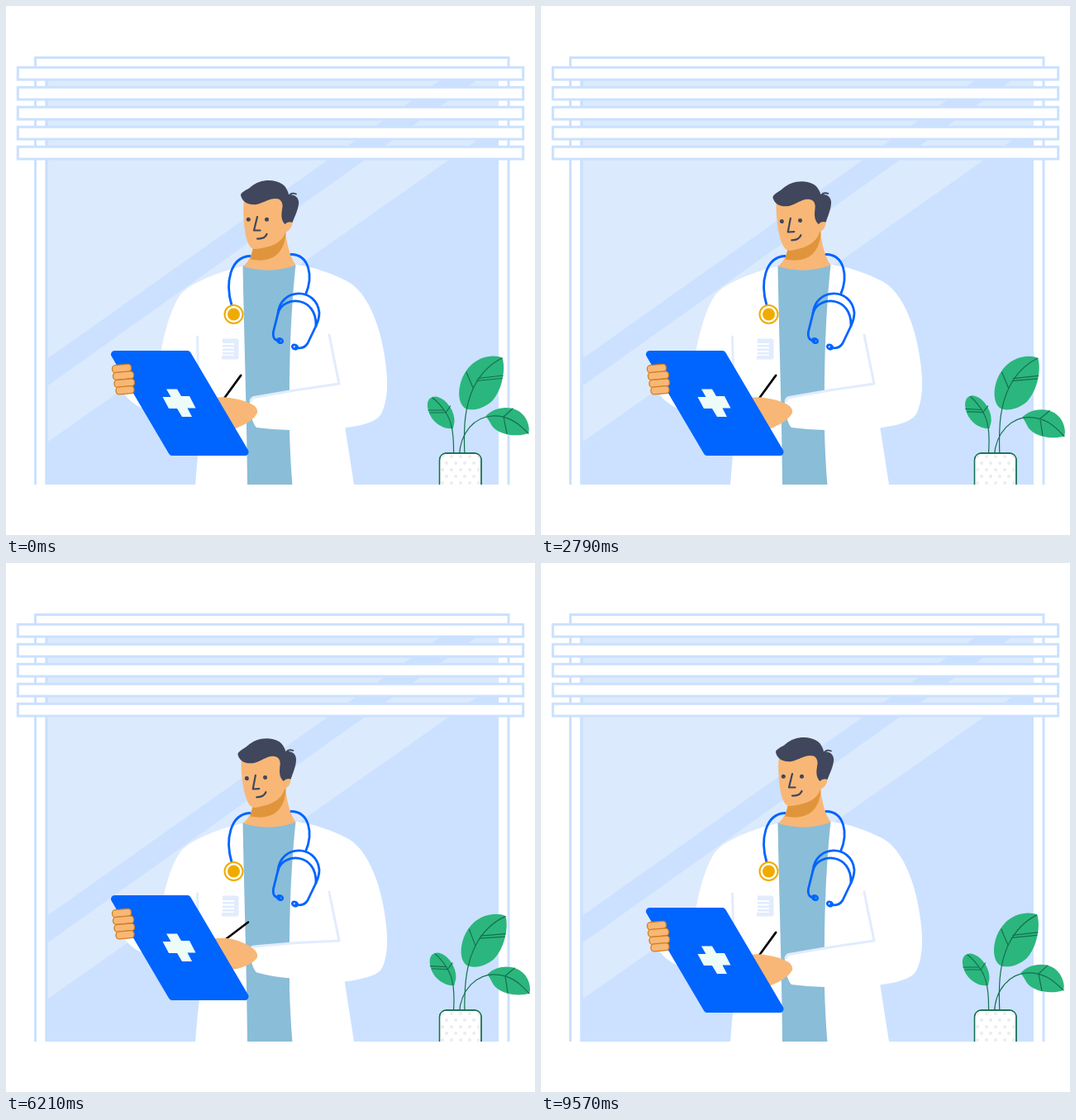
An HTML page for the animation above (9.64 s loop, 640 by 640 pixels).

```html
<!DOCTYPE html>
<html lang="en">
<head>
<meta charset="utf-8">
<title>Doctor at the window</title>
<style>
html, body { margin: 0; width: 100%; height: 100%; overflow: hidden; background: #fff; }
svg { display: block; width: 100vw; height: 100vh; }
.line { fill: none; stroke-linecap: round; stroke-linejoin: round; }
.frame { fill: #fff; stroke: #cbe1ff; stroke-width: 3; }
.fold { stroke: #e1ecfd; stroke-width: 3; }
.tube { stroke: #0064ff; stroke-width: 2.8; }
.ink { stroke: #40465c; stroke-width: 2.2; }
.leaf { fill: #2bb67d; }
.vein { stroke: #146f50; stroke-width: 1.2; }
.skin { fill: #f8b776; }
.hair { fill: #40465c; }
.white { fill: #fff; }
</style>
</head>
<body>
<svg viewBox="0 0 640 640" xmlns="http://www.w3.org/2000/svg">
  <defs>
    <clipPath id="room"><rect width="640" height="579"/></clipPath>
    <pattern id="dots" x="524" y="541" width="11" height="16" patternUnits="userSpaceOnUse">
      <g fill="#ededf0"><circle cx="4" cy="4" r="2.1"/><circle cx="9" cy="12" r="2.1"/></g>
    </pattern>
  </defs>
  <g clip-path="url(#room)">
    <rect class="frame" x="35.5" y="62.5" width="572.5" height="540"/>
    <rect x="47.3" y="88" width="548.7" height="500" fill="#cbe1ff"/>
    <path fill="#dceafd" d="M51 88H528L51 426ZM51 459L572 88H596V144L51 527Z"/>
    <g id="slats"></g>

    <path class="white" d="M286 315C262 320 225 334 213 347C200 362 192 395 188 415V430L235 520L232 544L229 579H421L409 502L452 490C461 480 461 465 461 450C459 415 447 352 413 333C395 324 372 315 350 313Z"/>
    <path fill="#8abdd8" d="M286.500 314Q318 324 350.500 313C346 355 343 410 343 470V515Q344 550 346.500 580H292C291 480 288 400 286.500 314Z"/>
    <path class="skin" d="M338 272Q341 300 350.500 313.500Q320 325 287 315Q297 307 300 288Z"/>
    <path fill="#e0953c" d="M300 288L295.500 306.500C318 311 338 303 338.500 272Z"/>
    <path class="line fold" d="M231.500 400L232.500 440M391 398L403 457"/>
    <path fill="#e1ecfd" d="M262 402.500H279Q281.500 402.500 281.500 405V425Q281.500 427.500 279 427.500H261V423H276V421.500H262V419H276V417H262V414.500H276V412.500H262V410H276V408H262Z"/>

    <g class="line tube">
      <path d="M295 302.500C271 304 265 335 273 362M345 300.500C367 301 372 327 362.500 349"/>
      <path d="M329 372C332 340 376 340 379 371Q379 378 375.500 386L365 408Q360 416 350.500 413"/>
      <path d="M375 387C376 351 337 350 329.500 370L323.500 394Q322 405 331 405"/>
      <ellipse cx="331.500" cy="405" rx="3.300" ry="2.500" transform="rotate(25 331.500 405)"/>
      <ellipse cx="349.500" cy="412.500" rx="3.300" ry="2.500" transform="rotate(25 349.500 412.500)"/>
    </g>
    <circle cx="275.500" cy="373" r="11" fill="#fff" stroke="#f0ab00" stroke-width="2"/>
    <circle cx="275.500" cy="373" r="7.500" fill="#f0ab00"/>

    <g id="head">
      <path class="skin" d="M288 234C286 250 288 275 293 287Q296 295 303 294C319 292 334 287 338 274Q346 270 346.500 262L338 226Z"/>
      <path class="hair" d="M284 229C284 225 291 223 296 219C307 209.500 324 208.500 335 216C339 219 341 224 342 228C351 228 355 233 354 240C353 248 349 255 346.500 262Q341 260 337.500 264C331.500 258 333.500 250 334.500 243C335 237 332 233 326 233C318 233 312 238 303 240C294 241 286 238 284 229Z"/>
      <path class="line ink" style="stroke-width:1.800" d="M342 230Q345 225 351 227.500"/>
      <path class="line ink" d="M304 255L300 271.500H307.500M304 281.500Q313 282 315.500 276"/>
      <g id="eyes" class="hair"><circle cx="293.300" cy="258.200" r="2.500"/><circle cx="315.500" cy="258.200" r="2.500"/></g>
    </g>

    <path id="sleeve" class="white"/>
    <path id="crease" class="line fold"/>
    <path id="pen" stroke="#000" stroke-width="2.600" stroke-linecap="round"/>
    <path id="hand" class="skin"/>

    <g id="board">
      <path class="white" d="M139 460Q144 478 168 488L155 455Z"/>
      <path d="M131.500 421.500H219.500L289 539.500H201Z" fill="#0064ff" stroke="#0064ff" stroke-width="9" stroke-linejoin="round"/>
      <path fill="#eefcf7" d="M194 463.500H207L212 472H222L229.500 486.500H219.500L225 497H213L207 487H197L189.500 473H199.500Z"/>
      <g id="fingers" class="skin" stroke="#d17f1e" stroke-width="1.300"></g>
    </g>

    <g id="small">
      <path class="leaf" d="M541 511C528 513 512 502 510 485C509 476 514 472 520 472.500C533 475 543 490 542.500 503Z"/>
      <path class="line vein" d="M541.500 545C542 520 540 503 531.500 491Q524 480 516 474M511 489H530.500M513 492H532M537.500 484L532 492"/>
    </g>
    <g id="big">
      <path class="leaf" d="M557 487.500C544 482 545 452 562 435C573 424 590 421 600.500 425.500C605 440 600 465 588 478C578 487 566 490 557 487.500Z"/>
      <path class="line vein" d="M555 545C553 505 556 482 566 461C576 441 588 432 600 426M557 443L565 462M571 450.500L601 447M569.500 453.500L600 450.500"/>
    </g>
    <g id="right">
      <path class="leaf" d="M580.500 496C592 483.500 615 482 626 495C632 502 634 512 632 517C618 522 596 519 588 508Q584 501 580.500 496Z"/>
      <path class="line vein" d="M548.500 545C549 515 568 497 588 496C608 495 620 505 632 517M602 497L606 517.500M602 497L613 487"/>
    </g>
    <g stroke="#146f50" stroke-width="1.300">
      <rect x="524.500" y="541" width="50.500" height="60" rx="8" fill="#fff"/>
      <rect x="524.500" y="541" width="50.500" height="60" rx="8" fill="url(#dots)"/>
    </g>
  </g>
</svg>
<script>
const LOOP = 9640;
const $ = id => document.getElementById(id);
const set = (id, name, value) => $(id).setAttribute(name, value);

for (let i = 0; i < 5; i++) {
  $('slats').innerHTML += `<rect class="frame" x="14.300" y="${74.3 + 24 * i}" width="611.400" height="14.800"/>`;
}
[[128.5, 434, 23], [129.5, 442.7, 25], [131, 451.7, 24.5], [133, 460.3, 22]].forEach(([x, y, w]) => {
  $('fingers').innerHTML += `<rect x="${x}" y="${y}" width="${w}" height="9" rx="4" transform="rotate(-5 ${x + w / 2} ${y + 4.5})"/>`;
});

// Eased interpolation between [time, value] keys.
function track(keys, t) {
  const i = keys.findIndex(k => k[0] > t);
  if (i < 0) return keys[keys.length - 1][1];
  const [t0, a] = keys[i - 1], [t1, b] = keys[i];
  const p = (t - t0) / (t1 - t0);
  return a + (b - a) * p * p * (3 - 2 * p);
}

const BOARD = [[0, 0], [3540, 0], [4540, 15], [7340, 15], [8380, 0], [LOOP, 0]];
const TILT = [[0, 0], [500, 0], [1500, 1], [2850, 1], [3900, 0], [4160, 0], [4980, 1], [7290, 1], [8290, 0], [LOOP, 0]];
const WRITE = [[0, 0], [550, 1], [1100, .1], [1640, 1], [2200, .3], [2500, .9], [2790, 0], [3400, .9],
  [4140, .6], [4600, .2], [5100, .8], [5650, .2], [6210, .85], [6750, .2], [7300, .8], [7550, .5],
  [7790, .95], [8300, .2], [8750, .9], [9150, .2], [9350, .3], [9570, 0], [LOOP, 0]];
const BLINK = [[0, 1], [5430, 1], [5530, .1], [5630, 1], [LOOP, 1]];

function sway(id, t, peak, amp, x) {
  const wave = p => Math.cos(2 * Math.PI * (p - peak));
  set(id, 'transform', `rotate(${amp * (wave(2 * t / LOOP) - wave(0))} ${x} 541)`);
}

function drawArm(lift) {
  const y = (base, k = 1) => (base - k * lift).toFixed(2);
  const cuff = `M403 457L352 ${y(464.5, .25)}L300 ${y(473.5, .48)}`;
  set('crease', 'd', `${cuff}Q297 ${y(474.5, .5)} 296 ${y(478, .6)}`);
  set('sleeve', 'd', `${cuff}Q294 ${y(475, .6)} 295 ${y(482, .7)}
    C296 ${y(497, .75)} 299 ${y(506, .75)} 303 ${y(510, .75)}Q322 ${y(512.5, .6)} 343 ${y(513, .55)}
    L410 ${y(510.5, .2)}C430 ${y(507.5, .2)} 446 ${y(504, .2)} 453 ${y(495, .1)}Q461 482 461 455Z`);
  set('hand', 'd', `M246 ${y(475)}Q260 ${y(472)} 273 ${y(474.5)}Q291 ${y(477, .9)} 301 ${y(484, .8)}
    Q305 ${y(488, .78)} 304 ${y(492, .78)}Q300 ${y(502, .85)} 278 ${y(511)}L265 ${y(511)}Z`);
  const angle = (54 - .85 * lift) * Math.PI / 180;
  const px = 263 + lift * .07, py = 476 - lift;
  set('pen', 'd', `M${px} ${py}L${px + 36 * Math.cos(angle)} ${py - 36 * Math.sin(angle)}`);
}

function draw(now) {
  const t = now % LOOP;
  const rise = track(BOARD, t);
  set('board', 'transform', `translate(0 ${-rise})`);
  set('head', 'transform', `rotate(${-3 * track(TILT, t)} 338 297)`);
  set('eyes', 'transform', `translate(0 258.200) scale(1 ${track(BLINK, t)}) translate(0 -258.200)`);
  drawArm(rise + 5.5 * track(WRITE, t));
  sway('small', t, .46, 1.85, 541);
  sway('big', t, .31, 1.45, 555);
  sway('right', t, .42, 1.7, 549);
  requestAnimationFrame(draw);
}
requestAnimationFrame(draw);
</script>
</body>
</html>
```
